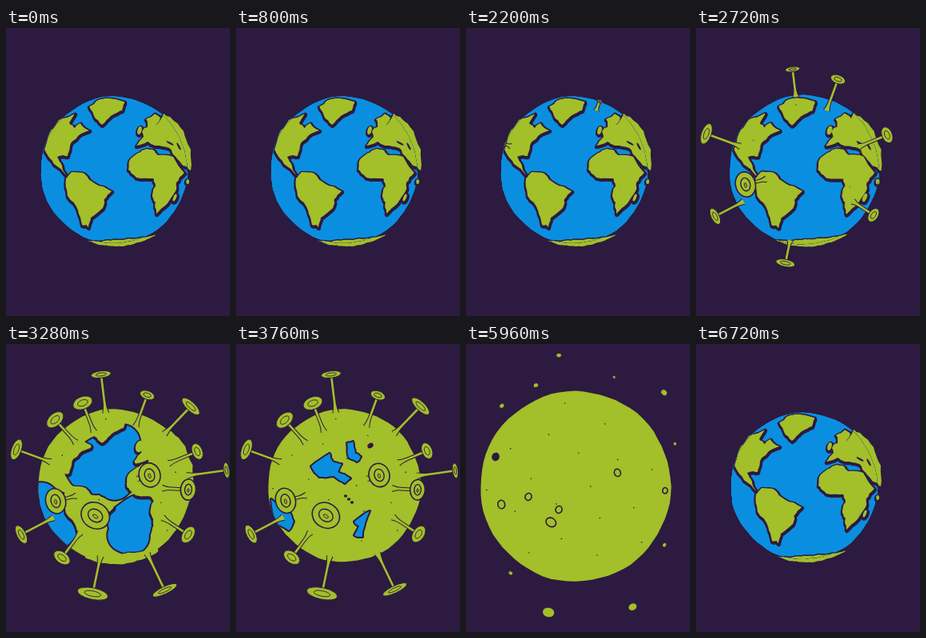
Write an HTML page with a canvas that moves like this. It is 280 by 360 pixels and loops after 6760 ms.

```html
<!DOCTYPE html>
<html lang="en">
<head>
<meta charset="utf-8">
<title>Globe</title>
<style>
  html, body { margin: 0; width: 100%; height: 100%; overflow: hidden; background: #2c1a40; }
  canvas { display: block; }
</style>
</head>
<body>
<canvas id="stage" width="280" height="360"></canvas>
<script>
const LOOP = 6760, STEP = 40, W = 280, H = 360;
const DARK = '#2c1a40', BLUE = '#0a8fe0', GREEN = '#a3bf2a';
const ctx = document.getElementById('stage').getContext('2d');
const sea = document.createElement('canvas');
sea.width = W;
sea.height = H;
const sx = sea.getContext('2d');

const clamp = v => Math.max(0, Math.min(1, v));
const span = (t, a, b) => clamp((t - a) / (b - a));
const mix = (a, b, u) => a + (b - a) * u;
const easeOut = u => 1 - (1 - u) * (1 - u);
const easeInOut = u => u * u * (3 - 2 * u);
const overshoot = u => 1 - 2 * (1 - u) ** 3 + (1 - u) ** 2;
const rand = n => { const s = Math.sin(n * 127.1 + 31.7) * 43758.5453; return s - Math.floor(s); };

// Closed outline whose edges are split and roughened like a hand-drawn coast
let seed = 1;
function coast(flat, rough = 3) {
  let pts = [];
  for (let i = 0; i < flat.length; i += 2) pts.push([flat[i], flat[i + 1]]);
  for (let pass = 0; pass < 2; pass++, rough /= 2) {
    pts = pts.flatMap((p, i) => {
      const q = pts[(i + 1) % pts.length];
      return [p, [0, 1].map(k => (p[k] + q[k]) / 2 + (rand(seed++) - 0.5) * rough)];
    });
  }
  const path = new Path2D();
  pts.forEach(p => path.lineTo(...p));
  path.closePath();
  return path;
}

function spot(x, y, rx, ry, turn) {
  const path = new Path2D();
  path.ellipse(x, y, rx, ry, turn, 0, 7);
  return path;
}

// Crescent along the lower rim of the globe
function iceCap() {
  const pts = [], n = 9;
  for (let i = 0; i <= 2 * n; i++) {
    const u = i <= n ? i / n : (2 * n - i) / n;
    const a = mix(57, 111, u) * Math.PI / 180;
    const r = mix(96, 94, u) - (i > n ? 8 * Math.sin(u * Math.PI) : 0);
    pts.push(135 + r * Math.cos(a), 178 + r * Math.sin(a));
  }
  return coast(pts, 1.5);
}

const greenland = coast([104,98, 113,91, 130,88, 148,92, 145,103, 131,110, 120,121, 111,112]);
const northAmerica = coast([48,152, 54,132, 66,115, 86,107, 79,119, 86,125, 93,119, 104,128, 90,135, 80,147, 77,160, 64,161, 70,172, 75,184, 60,170]);
const southAmerica = coast([75,188, 82,180, 98,182, 112,195, 132,204, 123,214, 121,225, 106,237, 103,249, 95,246, 90,228, 77,210]);
const africa = coast([153,177, 156,163, 170,153, 183,152, 190,159, 209,161, 223,181, 213,193, 212,204, 202,219, 188,232, 187,218, 183,208, 187,198, 184,188, 163,187]);
const eurasia = coast([163,147, 172,136, 171,128, 177,124, 175,114, 186,107, 193,112, 187,122, 197,107, 205,111, 222,129, 231,152, 231,178, 221,172, 209,158, 204,150, 186,147, 177,142]);
const lands = [greenland, northAmerica, southAmerica, africa, eurasia, iceCap(),
  spot(167, 128, 2.5, 5, 0.3), spot(211, 212, 2, 5, 0.4), spot(227, 192, 2, 3, 0)];
const inlets = [spot(216, 148, 1.2, 5, -0.5), spot(205, 144, 5, 1.2, 0.5)];

// Last pools of water, each shrinking towards its own centre
const pool = (x, y, flat) => ({ x, y, path: coast(flat, 2) });
const pools = [
  pool(120, 157, [94,153, 117,137, 121,147, 132,150, 127,160, 143,168, 136,174, 122,165, 104,166]),
  pool(147, 134, [139,124, 146,122, 149,137, 156,141, 151,147, 141,142]),
  pool(156, 226, [148,222, 167,209, 160,229, 158,241, 148,239, 154,227]),
  pool(57, 215, [44,194, 56,206, 66,207, 72,222, 66,233, 48,224])
];

// Heads as [x, y, size], in the three waves in which they shoot out
const waves = [
  { start: 2160, gap: 20, heads: [[177,64,9], [13,132,13], [239,134,10], [62,196,15]] },
  { start: 2550, gap: 25, heads: [[19,238,12], [228,238,11], [119,38,12], [108,312,19]] },
  { start: 2780, gap: 25, heads: [[61,95,12], [231,78,14], [70,267,11], [96,74,12], [198,307,16], [227,182,12], [274,158,9], [112,214,17], [179,164,14]] }
];
const MID = { x: 136, y: 177 };
const spikes = waves.flatMap(w => w.heads.map(([x, y, size], i) => {
  const dx = x - MID.x, dy = y - MID.y, d = Math.hypot(dx, dy);
  return {
    size, d, ux: dx / d, uy: dy / d,
    root: Math.min(94, d / 1.53),
    flat: 0.9 * Math.sqrt(1 - (d / 150) ** 2),
    turn: Math.atan2(dy, dx),
    start: w.start + i * w.gap,
    front: d < 95
  };
}));
const dents = [[37,141], [78,191], [116,207]];

function oval(x, y, rx, ry, turn, fill, line) {
  ctx.beginPath();
  ctx.ellipse(x, y, Math.max(0, rx), Math.max(0, ry), turn, 0, 7);
  if (fill) { ctx.fillStyle = fill; ctx.fill(); }
  if (line) { ctx.strokeStyle = DARK; ctx.lineWidth = line; ctx.stroke(); }
}

function blob(ball, r, tick) {
  const path = new Path2D(), n = 72;
  for (let i = 0; i < n; i++) {
    const a = i / n * Math.PI * 2;
    const d = r + 0.5 * Math.sin(a * 7 + 1) + 0.7 * (rand(i + 90 * (tick % 3)) - 0.5);
    path.lineTo(ball.x + d * Math.cos(a), ball.y + d * Math.sin(a));
  }
  path.closePath();
  return path;
}

function zoomTo(c, ball) {
  const z = Math.max(1, ball.r / 95.5);
  c.translate(ball.x, ball.y);
  c.scale(z, z);
  c.translate(-ball.x, -ball.y);
  c.lineJoin = c.lineCap = 'round';
}

function paintLands(c, grow) {
  c.lineWidth = grow;
  for (const l of lands) {
    c.fill(l);
    if (grow > 0) c.stroke(l);
  }
}

function drawSea(ball, ill, dry, tick) {
  sx.clearRect(0, 0, W, H);
  if (dry === 1) return;
  const spread = 260 * (1 - ill) ** 2;
  sx.save();
  sx.clip(blob(ball, ball.r, tick));
  zoomTo(sx, ball);
  for (const [color, rim] of [[DARK, 4], [BLUE, 0]]) {
    sx.strokeStyle = sx.fillStyle = color;
    for (const p of pools) {
      sx.save();
      sx.translate(p.x, p.y);
      sx.scale(1 - dry, 1 - dry);
      sx.translate(-p.x, -p.y);
      sx.lineWidth = spread + rim;
      if (spread + rim > 0) sx.stroke(p.path);
      sx.fill(p.path);
      sx.restore();
    }
  }
  if (ill < 1) {
    sx.globalCompositeOperation = 'source-atop';
    sx.strokeStyle = sx.fillStyle = DARK;
    sx.translate(0.5, 1.4);
    paintLands(sx, 8 * ill + 5.5);
    sx.translate(-0.5, -1.4);
    sx.globalCompositeOperation = 'destination-out';
    paintLands(sx, 8 * ill);
  }
  sx.restore();
}

function stem(s, a, b, ox, oy) {
  if (b - a < 1) return;
  const side = (k, wide) => {
    const at = (d, w) => [ox + s.ux * d - s.uy * w * k, oy + s.uy * d + s.ux * w * k];
    return [at(a, wide), at(mix(a, b, 0.12), 1.3), at(b, 1.3)];
  };
  const trace = ([p, q, r]) => { ctx.quadraticCurveTo(...q, ...mixPoint(q, r)); ctx.lineTo(...r); };
  const mixPoint = (p, q) => [mix(p[0], q[0], 0.25), mix(p[1], q[1], 0.25)];
  const left = side(1, 3.6), right = side(-1, 3.6);
  ctx.beginPath();
  for (const e of [left, right]) { ctx.moveTo(...e[0]); trace(e); }
  ctx.strokeStyle = DARK;
  ctx.lineWidth = 2;
  ctx.stroke();
  ctx.beginPath();
  ctx.moveTo(...left[0]);
  trace(left);
  ctx.lineTo(...right[2]);
  ctx.lineTo(...mixPoint(right[1], right[2]));
  ctx.quadraticCurveTo(...right[1], ...right[0]);
  ctx.fillStyle = GREEN;
  ctx.fill();
}

function drawSpike(s, i, t) {
  const u = span(t, s.start, s.start + 480);
  if (!u || t >= 6220) return;
  const g = Math.max(0, overshoot(u));
  const x = (t - 5520) / 440;
  const burst = easeOut(clamp(x));
  const fly = 24 * Math.min(1, s.d / 100) * (burst + Math.max(0, x - 1) * 0.7);
  const sway = u === 1 && !burst ? 0.5 * Math.sin(t / 190 + i * 1.9) : 0;
  const reach = mix(s.root, s.d, g) + fly;
  const ox = MID.x - s.uy * sway, oy = MID.y + s.ux * sway;
  const px = ox + s.ux * reach, py = oy + s.uy * reach;
  const snap = span(t, 5520, 5700);
  if (snap < 1) stem(s, mix(s.root, reach, snap), reach, ox, oy);

  const fade = 1 - span(t, 5960, 6220);
  const long = mix(s.size * g, s.size ** 2 / 50, burst) * fade;
  const short = long * mix(s.flat, 0.8, burst);
  if (long < 0.3) return;
  const line = s.front ? 1.6 : 1;
  oval(px, py, short + line / 2, long + line / 2, s.turn, GREEN, line);
  if (burst < 0.7) {
    oval(px, py, short * 0.5, long * 0.55, s.turn, null, s.front ? 1.4 : 0.9);
    if (s.front) oval(px, py + 1, short * 0.12, long * 0.2, s.turn, null, 1);
  }
}

function draw(t) {
  const tick = Math.floor(t / 120);
  const sick = easeInOut(span(t, 2120, 3440));
  const swell = easeOut(span(t, 5520, 5960));
  const heal = easeInOut(span(t, 6190, 6520));
  const at = (earth, virus, big) => mix(mix(mix(earth, virus, sick), big, swell), earth, heal);
  const ball = { x: at(135, 135.5, 137), y: at(177.5, 177, 178), r: at(91.5, 95.5, 119) };
  const ill = span(t, 2560, 3760) - span(t, 6260, 6600);
  const dry = span(t, 3760, 4240) - span(t, 6220, 6300);

  ctx.fillStyle = DARK;
  ctx.fillRect(0, 0, W, H);
  ctx.fillStyle = ctx.strokeStyle = GREEN;
  ctx.fill(blob(ball, ball.r - 10 * (1 - Math.min(1, ill * 2)), tick));
  if (ill < 1) {
    ctx.save();
    zoomTo(ctx, ball);
    paintLands(ctx, 8 * ill);
    ctx.fillStyle = DARK;
    if (ill < 0.4) inlets.forEach(p => ctx.fill(p));
    ctx.restore();
  }

  const dots = span(t, 2500, 2800) * (1 - span(t, 6200, 6320));
  for (let i = 0; i < 18; i++) {
    const a = i * 2.4, r = ball.r * Math.sqrt((i + 0.5) / 20);
    oval(ball.x + r * Math.cos(a), ball.y + r * Math.sin(a), 0.9 * dots, 0.7 * dots, 0, DARK);
  }
  drawSea(ball, ill, dry, tick);
  ctx.drawImage(sea, 0, 0);

  const bump = span(t, 3300, 3600) * (1 - span(t, 3800, 4160));
  oval(168, 127, 4 * bump, 3 * bump, -0.6, DARK);
  for (let i = 0; i < 3; i++) oval(137 + 4 * i, 190 + 4 * i, 2.2 * bump, 1.8 * bump, 0, DARK);

  spikes.forEach((s, i) => drawSpike(s, i, t));

  const dent = span(t, 5640, 5840) * (1 - span(t, 5980, 6220));
  if (dent) dents.forEach(([x, y], i) => oval(x, y, 4 * dent, 4.6 * dent, 0.3, i ? null : DARK, 1.6));
}

function frame() {
  const t = performance.now() % LOOP;
  draw(Math.floor(t / STEP) * STEP);
  requestAnimationFrame(frame);
}
frame();
</script>
</body>
</html>
```
